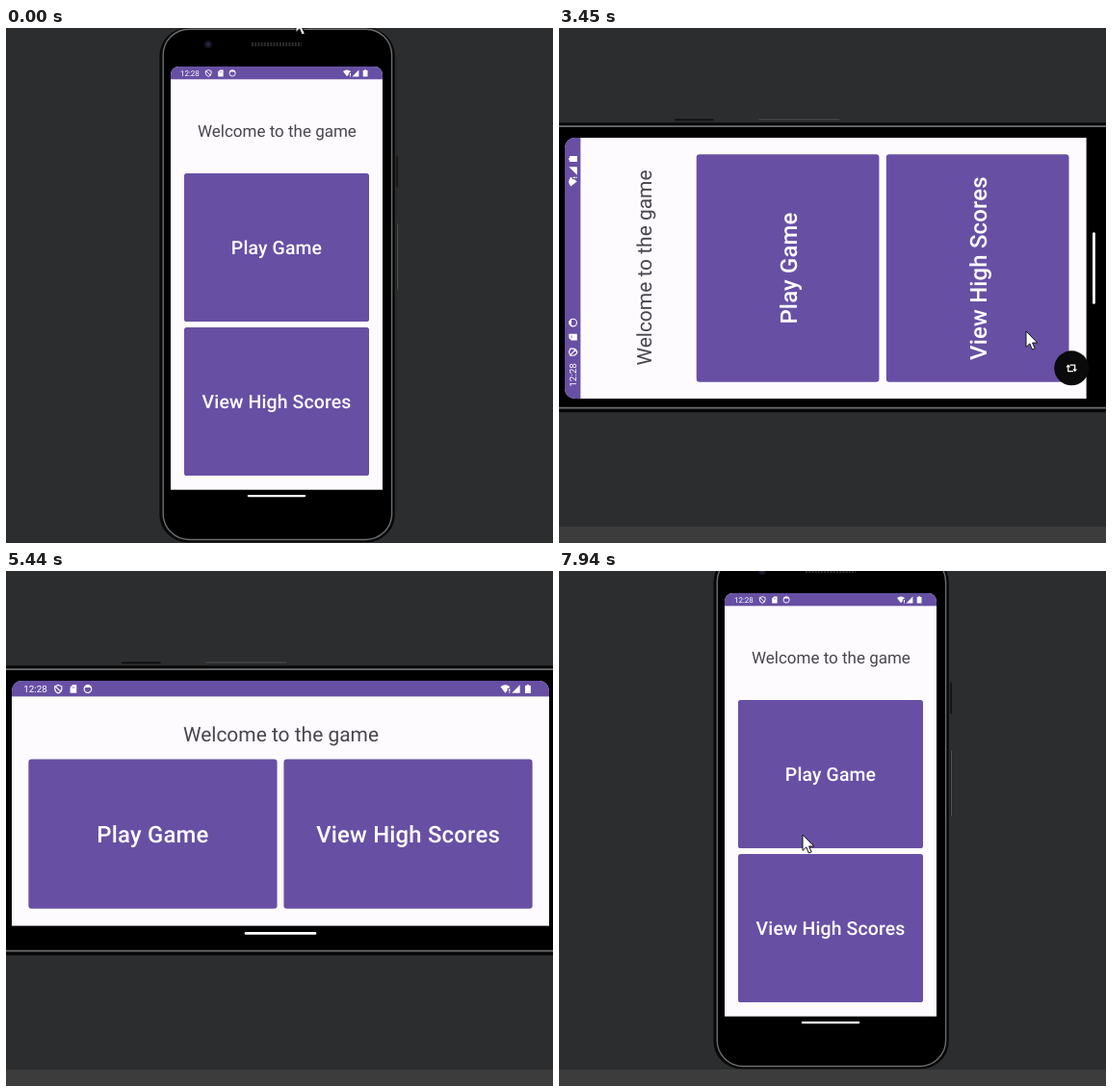
An HTML page for the animation above (8 s loop, 568 by 535 pixels).

```html
<!DOCTYPE html>
<html lang="en">
<head>
<meta charset="utf-8">
<title>Rotating phone</title>
<style>
  html, body { margin: 0; width: 100%; height: 100%; overflow: hidden; background: #2c2d2f; }
  svg { display: block; width: 568px; height: 535px; }
  text { font-family: Roboto, sans-serif; text-rendering: geometricPrecision; }
  .title { font-size: 17px; fill: #49454e; text-anchor: middle; }
  .label { font-size: 19.4px; font-weight: 500; letter-spacing: .15px; fill: #fff; text-anchor: middle; }
  .clock { font-size: 8px; fill: #fff; }
  .line { fill: none; stroke: #fff; }
</style>
</head>
<body>
<svg viewBox="0 0 568 535" id="stage"></svg>
<script>
const LOOP = 8000, ZOOM = 1.2318, PURPLE = '#6750a4';
const LONG = 453, SHORT = 220, BAR = 13.3;

const rect = (x, y, w, h, r, fill, more = '') =>
  `<rect x="${x}" y="${y}" width="${w}" height="${h}" rx="${r}" fill="${fill}" ${more}/>`;

const text = (cls, x, y, s) => `<text class="${cls}" x="${x}" y="${y}">${s}</text>`;

const button = (x, y, w, h, s) =>
  rect(x, y, w, h, 2.6, PURPLE) + text('label', x + w / 2, y + h / 2 + 7.4, s);

// Status bar icons sit at fixed distances from the two ends.
const statusBar = w => `
  ${rect(0, 0, w, BAR, 0, PURPLE)}
  ${text('clock', 9.9, 9.9, '12:28')}
  <path d="M39.2 3.6L42.1 4.7V7Q41.9 9.4 39.2 10.5Q36.5 9.4 36.3 7V4.7ZM36.4 4.4L41.6 9.4"
    class="line" stroke-width=".9"/>
  <path d="M51.2 3.5H54.6V10.4H49.2V5.5Z" fill="#fff"/>
  <path d="M51.4 5V6.4M52.7 5V6.4" fill="none" stroke="${PURPLE}" stroke-width=".5"/>
  <circle cx="64.1" cy="7" r="3.1" class="line" stroke-width=".9"/>
  <path d="M61 6.6A3.1 3.1 0 0 1 67.2 6.6L65.8 5.6H62.4Z" fill="#fff"/>
  <g transform="translate(${w} 7)" fill="#fff">
    <path d="M-41-2Q-37-5.2-33-2L-34-.7H-35.2V1.2L-37 3.3Z"/>
    <path d="M-34 0H-33V2H-34ZM-34 2.5H-33V3.4H-34Z"/>
    <path d="M-24.6-3.5V3.4H-31.4Z"/>
    <path d="M-18.8-3.7H-17V-3H-15.5V3.5H-20.3V-3H-18.8Z"/>
  </g>`;

const screen = (id, w, h, body) => `
  <g id="${id}">
    ${rect(-w / 2, -h / 2, w, h, 0, '#000')}
    ${rect(-w / 2, -h / 2, w, h - BAR, 0, '#fefbff')}
    <g transform="translate(${-w / 2} ${-h / 2})">${statusBar(w)}</g>
    ${rect(-30.3, h / 2 - 8.1, 60.6, 2.3, 1.1, '#fff')}
    ${body}
  </g>`;

const portraitView = screen('portrait', SHORT, LONG,
  text('title', .4, -153.2, 'Welcome to the game') +
  button(-96, -115.5, 192, 154, 'Play Game') +
  button(-96, 44.5, 192, 154, 'View High Scores'));

const landscapeView = screen('landscape', LONG, SHORT,
  text('title', .4, -58.9, 'Welcome to the game') +
  button(-212.4, -43.8, 209.6, 126, 'Play Game') +
  button(2.8, -43.8, 209.6, 126, 'View High Scores'));

const rotateButton = `
  <g id="hint" transform="translate(-84.3 200.7)">
    <circle id="disc" r="14.6"/>
    <g class="line" stroke-width="1">
      <path d="M-2.6 1.4V-2.8H2M2.6-1.4V2.8H-2"/>
      <path d="M.8-4.2L2.4-2.8L.8-1.4M-.8 4.2L-2.4 2.8L-.8 1.4"/>
    </g>
  </g>`;

stage.innerHTML = `
  <clipPath id="glass">${rect(-SHORT / 2, -LONG / 2, SHORT, LONG, 8.5, '#000')}</clipPath>
  <rect width="568" height="535" fill="#2c2d2f"/>
  <g id="phone">
    ${rect(124.4, -134, 1.4, 33, .5, '#0e0e0f')}
    ${rect(124.4, -63, 1.4, 68, .5, '#151515')}
    ${rect(125, -63, .7, 68, 0, '#6c6e70')}
    ${rect(-121.6, -266.5, 244.4, 534.3, 29, '#080808')}
    ${rect(-117.8, -265.3, 237.4, 530.3, 27, '#000', 'stroke="#6c6e70" stroke-width="1.4"')}
    <circle cx="-71" cy="-249.5" r="4" fill="#14141f"/>
    <circle cx="-71" cy="-249.5" r="1.7" fill="#2c2c4c"/>
    <path d="M-26-249.5H26" fill="none" stroke="#2c2c2c" stroke-width="4" stroke-dasharray="2 1.2"/>
    <g clip-path="url(#glass)">
      <g id="content">${landscapeView}${portraitView}</g>
      ${rotateButton}
    </g>
  </g>
  <rect id="band" y="518" width="568" height="17" fill="#3c3c3c"/>
  <path id="cursor" d="M0 0V16.4L3.8 12.9L6.4 19L9.2 17.8L6.6 12H11.8Z"
    fill="#fff" stroke="#111" stroke-width="1" stroke-linejoin="round"/>`;

const [portrait, landscape] = ['portrait', 'landscape'].map(id => document.getElementById(id));

// Pointer path: time, x, y; a lone time hides it.
const PATH = [
  [0, 301, -12], [80, 301, -12], [140],
  [2100, 54, -8], [2820, 101, 76], [2910, 103, 79], [3150, 106, 81],
  [3450, 485, 315], [3870, 527, 342], [4200, 527, 342], [4260, 526, 358],
  [5050, 524, 356], [5380, 115, 7], [5440],
  [6110, 112, 48], [6350, 215, 190], [6500, 296, 370], [6680, 209, 452],
  [6830, 202, 446], [6920, 200, 445], [7070, 200, 445],
  [7820, 249, 293], [7880, 251, 284], [7940, 253, 274], [LOOP, 253, 274]
];

const show = (el, on) => el.setAttribute('visibility', on ? 'visible' : 'hidden');
const clamp = v => Math.min(1, Math.max(0, v));
const hold = (t, step) => Math.floor(t / step) * step;

function pointer(t) {
  const i = PATH.findLastIndex(k => k[0] <= t);
  const [t0, x, y] = PATH[i], [t1, x1, y1] = PATH[i + 1];
  if (x === undefined) return null;
  if (x1 === undefined) return [x, y];
  const p = hold(t - t0, 75) / (t1 - t0);
  return [x + (x1 - x) * p, y + (y1 - y) * p];
}

// Progress of a screen rotation, advancing in 60 ms steps.
const turn = (t, start) => t < start ? 0 : clamp((hold(t - start, 60) + 60) / 330);
const ease = x => 1 - (1 - x) ** 2.26;

function draw(t) {
  const sideways = t >= 1600 && t < 5870;
  phone.setAttribute('transform', sideways
    ? `translate(285 249.5) rotate(-90) scale(${ZOOM})`
    : t < 80 ? 'translate(281 266.5)' : 'translate(282 249.5)');
  show(band, t >= 80);

  const back = t >= 5870;
  const x = turn(t, back ? 7070 : 3990);
  const angle = 90 * (back ? 1 - ease(x) : ease(x));
  content.setAttribute('transform', `rotate(${angle})`);
  const [from, to] = back ? [landscape, portrait] : [portrait, landscape];
  from.setAttribute('opacity', clamp(1 - x * 2.5));
  to.setAttribute('opacity', clamp(x * 1.18));

  show(hint, t >= 2310 && t < 3990 || t >= 6560 && t < 7070);
  disc.setAttribute('fill', t >= 3870 && t < 3990 || t >= 6920 ? '#2a2a2a' : '#0a0a0a');

  const at = pointer(t);
  show(cursor, at);
  if (at) cursor.setAttribute('transform', `translate(${at})`);
}

const begin = performance.now();
function tick() {
  draw((performance.now() - begin) % LOOP);
  requestAnimationFrame(tick);
}
tick();
</script>
</body>
</html>
```
